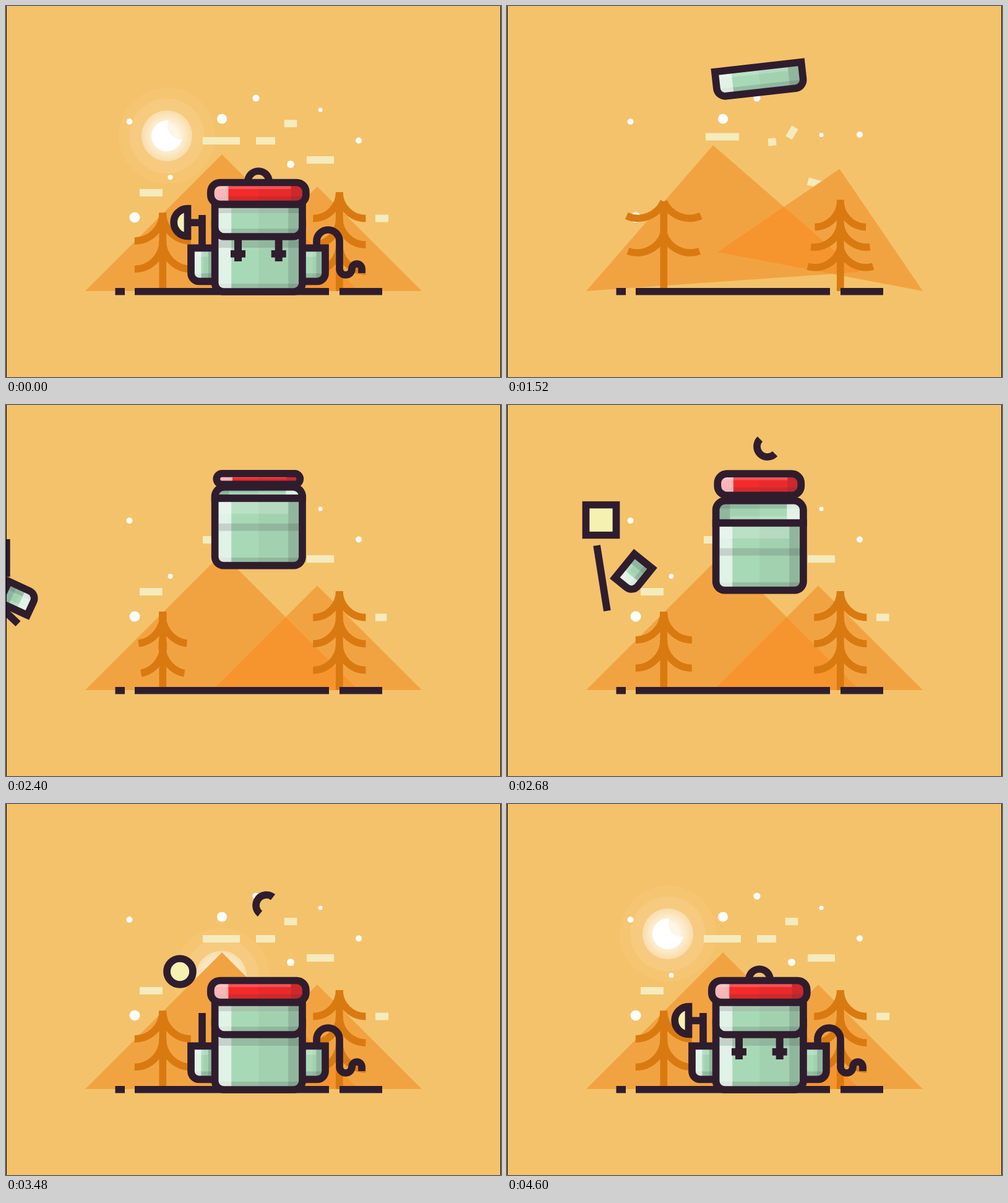
Recreate the animation shown at these times as an HTML page with a canvas. Size 800 px wide and 600 px high, loop 5.2 s.

```html
<!DOCTYPE html>
<html lang="en">
<head>
<meta charset="utf-8">
<title>Camping backpack</title>
<style>
html, body { margin: 0; width: 100%; height: 100%; overflow: hidden; background: #f4c26b; }
canvas { display: block; }
</style>
</head>
<body>
<canvas id="stage" width="800" height="600"></canvas>
<script>
const c = document.getElementById('stage').getContext('2d');
const LOOP = 5200, STEP = 40, START = 640, END = 4600;
const INK = '#2f1d2e', GREEN = '#a8d9b6', LEAF = '#d97a11', LINE = 11.7;
const SHADE = 'rgba(50,45,60,.16)';

// Timing helpers
const ramp = (t, a, b) => Math.min(Math.max((t - a) / (b - a), 0), 1);
const smooth = p => p * p * (3 - 2 * p);
const ease = (t, a, b) => smooth(ramp(t, a, b));
const mix = (a, b, p) => a + (b - a) * p;
const bump = (t, mid, reach) => smooth(Math.max(0, 1 - Math.abs(t - mid) / reach));
const backOut = (p, s) => 1 + (s + 1) * (p - 1) ** 3 + s * (p - 1) ** 2;

// Eased path through a few poses: [time, ...values]
function pose(t, ...rows) {
  let i = 0;
  while (i < rows.length - 2 && t >= rows[i + 1][0]) i++;
  const [a, b] = [rows[i], rows[i + 1]], p = ease(t, a[0], b[0]);
  return a.map((v, j) => mix(v, b[j], p)).slice(1);
}

// Drawing helpers
function at(x, y, deg, draw) {
  c.save();
  c.translate(x, y);
  c.rotate(deg * Math.PI / 180);
  draw();
  c.restore();
}

function rect(color, x, y, w, h) {
  c.fillStyle = color;
  c.fillRect(x, y, w, h);
}

function disc(x, y, r, fill) {
  c.fillStyle = fill;
  c.beginPath();
  c.arc(x, y, r, 0, 7);
  c.fill();
}

function ink(color = INK) {
  c.strokeStyle = color;
  c.lineWidth = LINE;
  c.stroke();
}

// Outlined box centred on the origin, lit from the left
function block(w, h, radii, fill, light = .16, dark = .87) {
  const iw = Math.max(w - LINE, 0), ih = Math.max(h - LINE, 0);
  c.beginPath();
  c.roundRect(-w / 2, -h / 2, w, h, radii);
  c.fillStyle = fill;
  c.fill();
  c.save();
  c.clip();
  rect('rgba(30,40,50,.045)', 0, -h, w, 2 * h);
  rect(SHADE, iw * (dark - .5), -h, w, 2 * h);
  rect(SHADE, -w, ih / 2 - Math.min(7, ih * .3), 2 * w, h);
  rect('rgba(255,255,255,.2)', -w, -h, w + iw * (dark - .5), h - ih / 2 + ih * .2);
  rect('rgba(255,255,255,.66)', -w, -h, w + iw * (light - .5), 2 * h);
  c.restore();
  c.beginPath();
  c.roundRect(-w / 2, -h / 2, w, h, radii);
  ink();
}

// Sky
const stars = [ // x, y, radius, start
  [404, 149, 5.6, 1090], [349, 182.5, 8, 1090], [508, 168, 3.5, 1455], [570, 217.5, 5, 1262],
  [460, 256, 6, 1500], [199.5, 187, 5, 1090], [265.5, 277, 4, 1520], [208, 342, 8.5, 1090]
];
const clouds = [ // x, y, width, start, fixed edge, drop, spin
  [348, 218, 60, 1100, 0, -50, 0], [419.5, 218, 31, 1505, 1, 2, -5], [460, 190, 20.5, 1075, 1, 137, -125],
  [508, 249, 44, 1421, -1, 54, 17], [234.5, 302, 37, 1775, -1, 0, 0], [607.5, 343.5, 21, 2120, -1, 0, 0]
];

function drawSun(t) {
  if (t < 3400) return;
  const x = mix(349, 260, ease(t, 3440, 4040));
  const y = mix(345, 210, backOut(ramp(t, 3400, 4040), 1.7));
  disc(x, y, 78, 'rgba(255,255,255,.045)');
  disc(x, y, 60.5, 'rgba(255,255,255,.1)');
  const glow = c.createRadialGradient(x, y, 18, x, y, 41);
  glow.addColorStop(0, 'rgba(255,252,246,.88)');
  glow.addColorStop(1, 'rgba(255,246,228,.42)');
  disc(x, y, 41, glow);
  c.save();
  c.beginPath();
  c.rect(x - 50, y - 50, 100, 100);
  c.arc(x + 22, y - 16, 21, 0, 7);
  c.clip('evenodd');
  disc(x, y, 25, '#fff');
  c.restore();
}

function drawSky(t) {
  drawSun(t);
  for (const [x, y, r, start] of stars) {
    const rise = backOut(ramp(t, start, start + 430), 1.7);
    disc(x, y + 95 * (1 - rise), r * ramp(t, start, start + 60), '#fff');
  }
  for (const [x, y, width, start, edge, drop, spin] of clouds) {
    if (t < start) continue;
    const left = 1 - ramp(t, start, start + 850), rest = left ** 3;
    const w = mix(width, 12, rest);
    at(x + edge * (width - w) / 2, y + drop * rest, spin * left, () => rect('#f5ebbd', -w / 2, -6, w, 12));
  }
}

// Land
function hill(x, size, start, t) {
  const turn = 46 * (1 - backOut(ramp(t, start, start + 882), 3)) * Math.sign(size);
  const path = new Path2D(), shape = new Path2D(`M0 0 L${size} ${-Math.abs(size)} L${2 * size} 0Z`);
  path.addPath(shape, new DOMMatrix().translate(x, 461).rotate(turn));
  return path;
}

function drawHills(t) {
  const near = hill(128, 221, 813, t), far = hill(672, -169, 1141, t);
  c.save();
  c.beginPath();
  c.rect(0, 0, 800, 461);
  c.clip();
  c.fillStyle = '#f2a341';
  c.fill(near);
  c.fill(far);
  c.clip(near);
  c.fillStyle = '#f6952e';
  c.fill(far);
  c.restore();
}

// A trunk shoots up, then its branches swing from top to bottom.
function drawTree(x, foot, top, r, levels, start, t) {
  const u = t - start, done = u > 1280;
  const grown = 1 - (1 - ramp(u, -220, 0)) ** 5;
  const spring = u < 0 || u > 1100 ? 0 : .24 * Math.exp(-u / 600) * Math.sin(u * Math.PI / 440);
  const stretch = grown * (1 + spring);
  const place = y => foot + (y - foot) * stretch;
  rect(LEAF, x - LINE / 2, place(top), LINE, foot - place(top));
  for (let i = 0; i < levels; i++) {
    const v = u - 100 * i, size = r * ramp(v, -100, 120);
    if (size < 1) continue;
    const lift = v < 0 || v > 1280 ? 0 : 31 * Math.exp(-v / 1200) * Math.sin(v * Math.PI / 640);
    for (const side of [-1, 1]) {
      at(x, place(top + i * r), -side * lift, () => {
        c.scale(side, 1);
        c.beginPath();
        c.arc(size, 0, size, Math.PI, Math.PI / 2, true);
        ink(LEAF);
      });
    }
  }
}

function drawGround(t) {
  [[539, 69], [208, 314], [176.5, 15.5]].forEach(([x, w], i) => {
    const end = 1160 + 40 * i;
    rect(INK, x + 640 * (1 - ramp(t, end - 520, end)) ** 3, 456, w, 11.5);
  });
}

// Backpack
function drawRope(t) {
  const part = ease(t, 2960, 3300), stretch = 1 + .5 * Math.sin(Math.PI * ramp(t, 3000, 3440));
  if (!part) return;
  c.save();
  c.save();
  c.translate(502, 0);
  c.scale(stretch, 1);
  c.beginPath();
  c.moveTo(0, 391);
  c.arc(18.5, 380.5, 18.5, Math.PI, 0);
  c.arc(47, 425, 10, Math.PI, 0, true);
  c.arc(65, 425, 8, Math.PI, 0);
  c.lineTo(73, 432);
  c.restore();
  if (part < 1) c.setLineDash([190 * part * stretch, 999]);
  ink();
  c.restore();
}

function drawPockets(t) {
  const [x, y, w, h, turn] = pose(t, [2240, -60, 330, 50, 37, -200], [2680, 204.5, 272, 50, 37, -51], [3160, 319.5, 418.3, 41, 54, 0]);
  at(x, y, turn, () => block(w, h, [0, 0, 0, 13], GREEN, .36, .75));
  if (t > 2960) at(mix(455, 495.5, ease(t, 2960, 3160)), 418.3, 0, () => block(41, 54, [0, 0, 13, 0], GREEN, 0, .7));
}

function drawLamp(t) {
  const [px, py, len, lean] = pose(t, [2260, -80, 330, 107, -60], [2680, 153.5, 280, 107, -9], [3160, 317, 364.5, 53, 0]);
  at(px, py, lean, () => rect(INK, -LINE / 2, -len / 2, LINE, len));
  const reach = 20 * ease(t, 3880, 4120);
  rect(INK, 317 - reach, 344.5, reach, LINE);

  const [x, y, size] = pose(t, [2300, -60, 260, 49], [2680, 152, 186, 49], [3480, 281, 271, 42], [3720, 293.5, 350, 44.6]);
  const r = size / 2, corner = r * ease(t, 2700, 3200), half = 1 - ease(t, 3600, 3900);
  const wobble = 8 * Math.sin(Math.PI * ramp(t, 3800, END) * 3) * (1 - ramp(t, 3800, END));
  at(x, y, wobble, () => {
    c.beginPath();
    if (corner < r) c.roundRect(-r, -r, size, size, corner);
    else {
      c.arc(0, 0, r, Math.PI / 2, Math.PI * 1.5);
      c.ellipse(0, 0, r * half, r, 0, -Math.PI / 2, Math.PI / 2);
      c.closePath();
    }
    c.fillStyle = '#f5f1b1';
    c.fill();
    ink();
  });
}

function drawHandle(t) {
  if (t < 2480) return;
  const fall = 17 + .001235 * (t - 3135) ** 2;
  const y = t < 3135 ? pose(t, [2480, 200], [2680, 67], [2840, 68], [3135, 17])[0] : Math.min(fall, 284);
  const turn = Math.min(0, -52 + .554 * (t - 3480));
  at(mix(421, 408, ease(t, 3480, 3600)), y, turn, () => {
    c.beginPath();
    c.arc(0, 0, 17, Math.PI, 0);
    ink();
  });
}

// The cloth tumbles in along a parabola until it hits the ground.
function drawTumble(t) {
  const u = (t - 1520) / 440, flat = bump(t, 1960, 120);
  const x = 408 - 500 * (1 - ramp(t, START, 1080)) ** 3;
  const y = Math.min(119 + 104.5 * u + 228.5 * u * u, 452);
  const turn = u < 0 ? -6.4 - 100 * u : -6.4 * (1 - ease(t, 1520, 1900));
  const w = mix(140.5, 228, flat), h = mix(41, 20, flat);
  at(x, y, turn, () => block(w, h, [0, 0, h / 3, h / 3], GREEN));
}

// The bag leaps, opens in the air, and folds shut on landing.
function drawBag(t) {
  const squash = bump(t, 2920, 100), open = ease(t, 2320, 2480), shut = ease(t, 2720, 2940);
  const jump = Math.max(0, 210 * (1 - ((t - 2480) / 420) ** 2));
  const x = 408.3, bottom = 462 - jump;
  const w = 141.3 + 87 * bump(t, 1960, 120) + 14 * squash;
  const h = mix(20, 109, ease(t, 1960, 2120)) - 16 * squash, round = Math.min(14, h / 4);
  at(x, bottom - h / 2, 0, () => block(w, h, [0, 0, round, round], GREEN));
  if (!open) return;

  rect(SHADE, x - w / 2 + 6, bottom - 68 - 15 * shut, w - 12, 12);
  const strap = 40 * backOut(ramp(t, 4000, 4400), 1.7);
  if (strap > 1) for (const sx of [375, 440.7]) {
    rect(INK, sx - 6, 373, 12, strap);
    rect(INK, sx - 12, 355 + strap, 24, LINE);
  }
  const fold = -36 * open + 88 * shut, hinge = bottom - h - 32 * shut;
  at(x, hinge + fold / 2, fold < 0 ? 180 : 0, () => block(w, Math.abs(fold), [0, 0, 15, 15], GREEN));
  rect(SHADE, x - w / 2 + 6, hinge + 6, w - 12, 8 * ramp(shut, .9, 1));
  drawHandle(t);
  const lidY = bottom - h - 62 * open + 12 * shut;
  at(x - .5, lidY, 0, () => block(mix(135, 154, shut) + 8 * squash, 35 * open, 15, '#f52a2a'));
}

function draw(t) {
  rect('#f4c26b', 0, 0, 800, 600);
  drawSky(t);
  drawHills(t);
  drawTree(253.3, 457, 334.5, 45.5, 2, 1260, t);
  drawTree(538.8, 461, 301, 42.6, 3, 860, t);
  drawGround(t);
  drawRope(t);
  drawPockets(t);
  drawLamp(t);
  if (t < 1960) drawTumble(t);
  else drawBag(t);
  rect('#000', 0, 0, 1, 600);
  rect('#000', 799, 0, 1, 600);
}

const origin = performance.now();
function tick() {
  const t = Math.floor((performance.now() - origin) % LOOP / STEP) * STEP;
  draw(t < START ? END : Math.min(t, END));
  requestAnimationFrame(tick);
}
tick();
</script>
</body>
</html>
```
